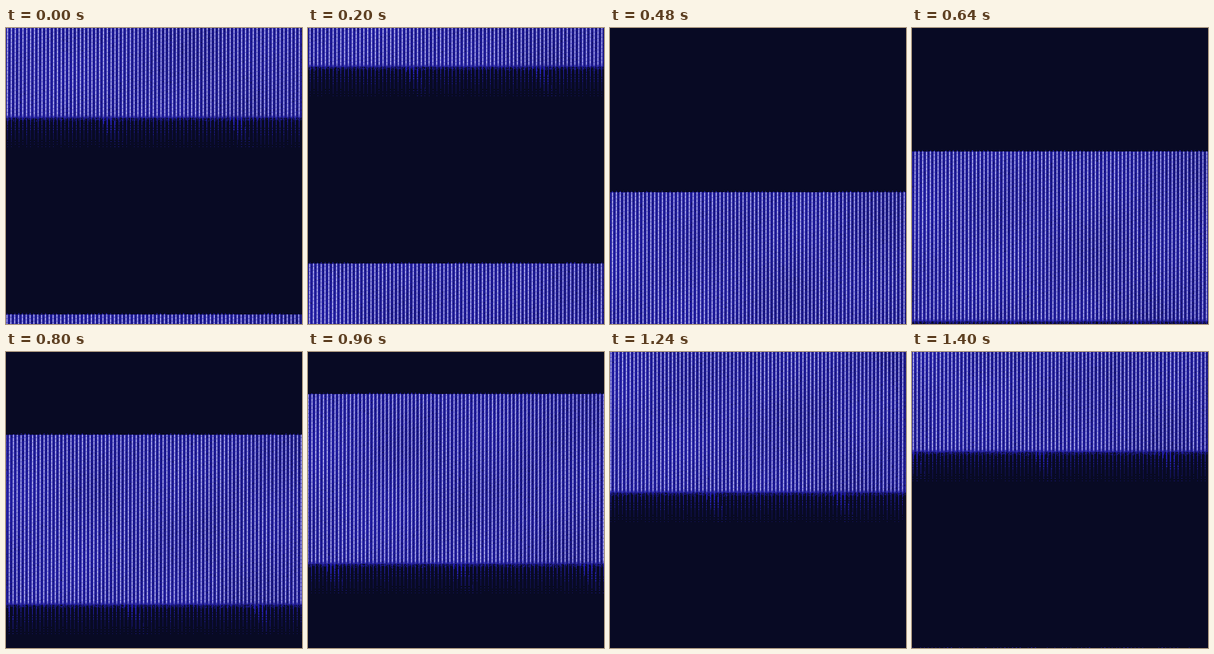
Recreate the animation shown at these times as an HTML page with a canvas. Size 465x465 px, loop 1440 ms.

```html
<!DOCTYPE html>
<html lang="en">
<head>
<meta charset="utf-8">
<title>Rolling scan band</title>
<style>
  html, body { margin: 0; width: 100%; height: 100%; overflow: hidden; background: #080a24; }
  canvas { display: block; width: 465px; height: 465px; }
</style>
</head>
<body>
<canvas id="stage" width="465" height="465"></canvas>
<script>
const SIZE = 465, LOOP = 1440, STEP = 40;
const ROLL = 576, LEAD = 2, BAND = 267, TAIL = 48, TOP = 450;
const PITCH = 6.03, TAU = Math.PI * 2;

const DARK = [8, 10, 36], NIGHT = [20, 19, 92], BLUE = [34, 30, 162];
const WHITE = [214, 212, 255], GLOW = [42, 36, 200];
const ORDER = [0, 0.5, 0.25, 0.75];

const ctx = document.getElementById('stage').getContext('2d');
const image = ctx.createImageData(SIZE, SIZE);
const px = new Uint32Array(image.data.buffer);

const wrap = (n, m) => ((n % m) + m) % m;
const clamp = n => Math.max(0, Math.min(1, n));
const rgb = c => (255 << 24 | c[2] << 16 | c[1] << 8 | c[0]) >>> 0;
const ramp = (a, b) => Uint32Array.from({ length: 33 }, (_, i) =>
  rgb(a.map((v, k) => Math.round(v + (b[k] - v) * i / 32))));
const pick = (colors, k) => colors[clamp(k) * 32 | 0];

const dark = rgb(DARK);
const gapRamp = ramp(BLUE, NIGHT);
const lineRamp = ramp(BLUE, WHITE);
const glowRamp = ramp(DARK, GLOW);

// Repeatable grain in 0..1
function grain(x, y) {
  let h = Math.imul(x + 11, 374761393) ^ Math.imul(y + 7, 668265263);
  h = Math.imul(h ^ (h >>> 13), 1274126177);
  return ((h ^ (h >>> 16)) >>> 0) / 4294967296;
}

// Faint broad shading, heavier towards the right
function shade(x, u) {
  const a = u * TAU / ROLL;
  return 0.14 + x / 2600
    + 0.06 * Math.sin(x / 58 - 2 * a + 0.6)
    + 0.05 * Math.sin(x / 37 + 3 * a + 1.4);
}

function bandColor(x, v, near) {
  const s = shade(x, v), g = grain(x, v);
  const cover = clamp(1.25 - near);
  if (cover > 0) {
    const dash = (v + Math.floor(x / PITCH) * 2) % 6 === 0 ? 0.45 : 1;
    const end = clamp((BAND - v) / 5);
    return pick(lineRamp, cover * dash * end * (1 - s * 0.4));
  }
  const isSpeck = near > 2 && g < s * 0.6;
  return pick(gapRamp, isSpeck ? 1 : s);
}

function tailColor(x, v, near) {
  const depth = (v - BAND) / TAIL;
  const g = grain(x, v);
  if (near < 0.55) {
    const reach = 1 - depth + 0.2 * (grain(x, 3) - 0.5);
    return ORDER[v % 4] < reach ? pick(glowRamp, 0.95 - depth * 0.5) : dark;
  }
  return g > 0.3 + depth * 6 ? pick(glowRamp, 0.5) : dark;
}

function draw(t) {
  const roll = t * ROLL / LOOP;
  for (let y = 0; y < SIZE; y++) {
    const u = wrap(y + roll - TOP + LEAD, ROLL) - LEAD;
    const row = y * SIZE;
    if (u >= BAND + TAIL) {
      px.fill(dark, row, row + SIZE);
      continue;
    }
    const v = Math.round(u);
    const shift = 2 + PITCH * t / LOOP - 0.002 * y;
    for (let x = 0; x < SIZE; x++) {
      const near = Math.abs(wrap(x - shift + PITCH / 2, PITCH) - PITCH / 2);
      let color;
      if (v < 0) color = near < 0.9 && grain(x, v) > 0.5 ? pick(glowRamp, 0.8) : dark;
      else if (v < BAND) color = bandColor(x, v, near);
      else color = tailColor(x, v, near);
      px[row + x] = color;
    }
  }
  ctx.putImageData(image, 0, 0);
}

const start = performance.now();
let last = -1;
function tick() {
  const t = Math.floor(((performance.now() - start) % LOOP) / STEP) * STEP;
  if (t !== last) draw(last = t);
  requestAnimationFrame(tick);
}
tick();
</script>
</body>
</html>
```
